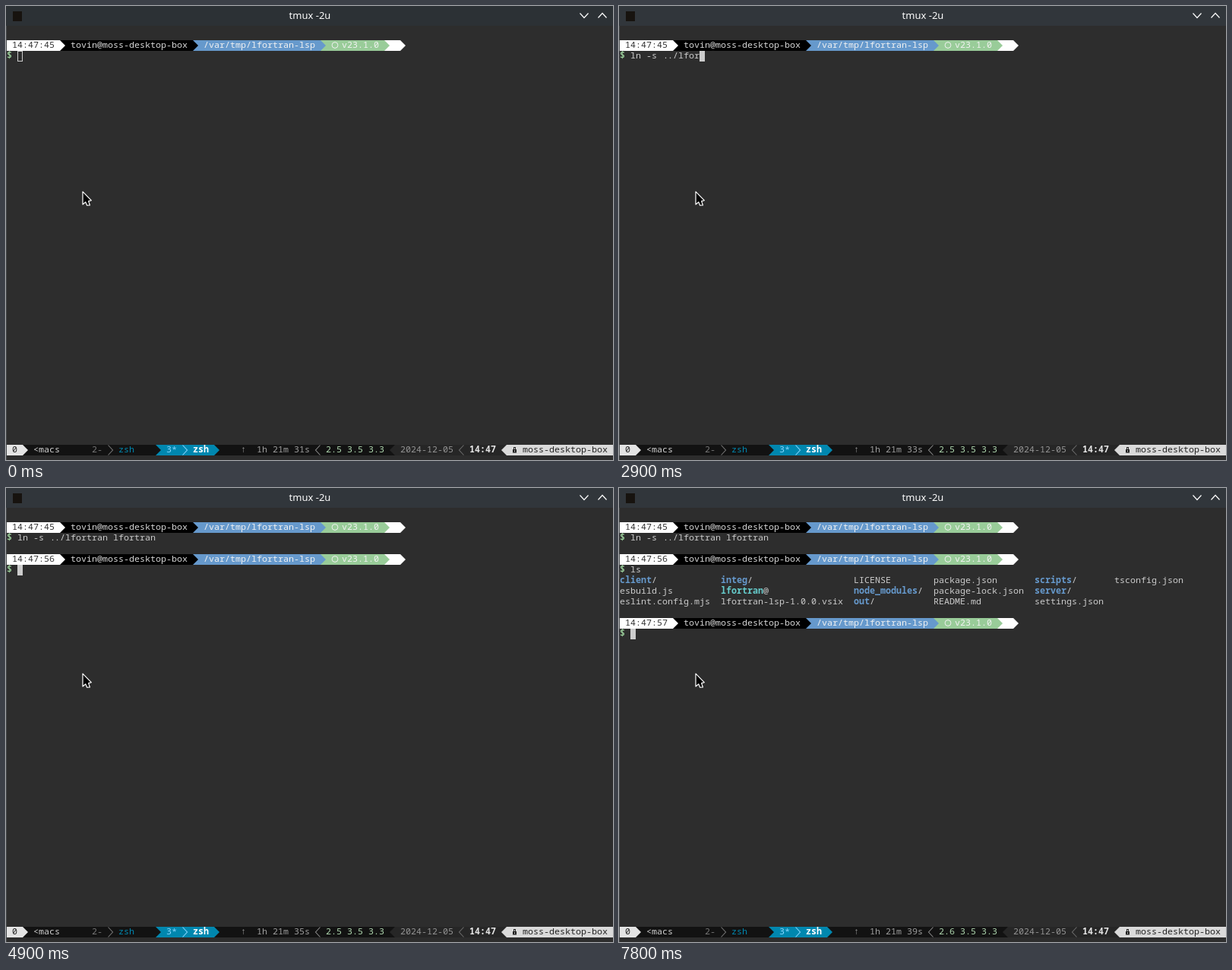
An HTML page with a canvas for the animation above (8000 ms loop, 799 px wide and 597 px high).

```html
<!DOCTYPE html>
<html lang="en">
<head>
<meta charset="utf-8">
<title>Terminal</title>
<style>
  html, body { margin: 0; width: 100%; height: 100%; overflow: hidden; background: #2d2d2d; }
  canvas { display: block; width: 799px; height: 597px; }
</style>
</head>
<body>
<canvas id="stage"></canvas>
<script>
const W = 799, H = 597, LOOP = 8000;
const CW = 7, CH = 14, TOP = 31;
const BG = '#2d2d2d', FG = '#cccccc', BLUE = '#6699cc', GREEN = '#99cc99', CYAN = '#66cccc';
const BAR = '#121212', TEAL = '#0087af', SKY = '#87d7ff', PALE = '#dadada';
const MONO = '11.667px "Noto Sans Mono", "DejaVu Sans Mono", monospace';
const USER = 'tovin', HOST = 'moss-desktop-box';

const canvas = document.getElementById('stage');
const ctx = canvas.getContext('2d');
const dpr = window.devicePixelRatio || 1;
canvas.width = Math.round(W * dpr);
canvas.height = Math.round(H * dpr);

const colX = c => 1 + c * CW;
const rowY = r => TOP + r * CH;

// Value of the last [time, value] step reached, or the fallback.
function stepAt(steps, t, fallback) {
  let v = fallback;
  for (const [at, value] of steps) if (t >= at) v = value;
  return v;
}

function fill(c, r, n, color) {
  ctx.fillStyle = color;
  ctx.fillRect(colX(c), rowY(r), n * CW, CH);
}

function text(s, c, r, color, weight = 500) {
  ctx.font = weight + ' ' + MONO;
  ctx.textAlign = 'left';
  ctx.textBaseline = 'alphabetic';
  ctx.fillStyle = color;
  for (let i = 0; i < s.length; i++) {
    const nudge = s.startsWith('../', i) ? 1 : 0;
    ctx.fillText(s[i], colX(c + i) + nudge, rowY(r) + 10);
  }
}

function path(points, close) {
  ctx.beginPath();
  points.forEach(([x, y], i) => i ? ctx.lineTo(x, y) : ctx.moveTo(x, y));
  if (close) ctx.closePath();
}

// Solid one-cell arrow; dir 1 points right, -1 left.
function arrow(c, r, color, back, dir = 1) {
  if (back) fill(c, r, 1, back);
  const x = colX(c), y = rowY(r);
  const base = dir > 0 ? x : x + CW, tip = dir > 0 ? x + CW : x;
  path([[base, y], [tip, y + CH / 2], [base, y + CH]], true);
  ctx.fillStyle = color;
  ctx.fill();
}

function line(points, color, width) {
  path(points);
  ctx.strokeStyle = color;
  ctx.lineWidth = width;
  ctx.stroke();
}

function chevron(c, r, color, dir = 1) {
  const x = colX(c), y = rowY(r);
  const base = dir > 0 ? x + 0.5 : x + CW - 0.5;
  const tip = dir > 0 ? x + CW - 0.5 : x + 0.5;
  line([[base, y + 0.5], [tip, y + CH / 2], [base, y + CH - 0.5]], color, 1.1);
}

function prompt(r, time) {
  fill(0, r, 10, '#ffffff');
  text(time, 1, r, '#333333');
  arrow(10, r, '#ffffff', '#000000');
  fill(11, r, 24, '#000000');
  text(USER + '@' + HOST, 12, r, '#d8d8d8');
  arrow(35, r, '#000000', BLUE);
  fill(36, r, 23, BLUE);
  text('/var/tmp/lfortran-lsp', 37, r, '#f2f2f2');
  arrow(59, r, BLUE, GREEN);
  fill(60, r, 11, GREEN);
  ctx.beginPath();
  ctx.arc(433, rowY(r) + 6.5, 3.9, 0, Math.PI * 2);
  ctx.strokeStyle = '#f2f2f2';
  ctx.lineWidth = 1;
  ctx.stroke();
  text('v23.1.0', 63, r, '#f2f2f2');
  arrow(71, r, GREEN, '#ffffff');
  fill(72, r, 2, '#ffffff');
  arrow(74, r, '#ffffff');
  text('$', 0, r + 1, GREEN, 700);
}

function cursor(c, r, hollow) {
  if (!hollow) return fill(c, r, 1, FG);
  ctx.strokeStyle = FG;
  ctx.lineWidth = 1;
  ctx.strokeRect(colX(c) + 0.5, rowY(r) + 0.5, CW - 1, CH - 1);
}

const LISTING = [
  [0, ['client/', 'esbuild.js', 'eslint.config.mjs']],
  [19, ['integ/', 'lfortran@', 'lfortran-lsp-1.0.0.vsix']],
  [44, ['LICENSE', 'node_modules/', 'out/']],
  [59, ['package.json', 'package-lock.json', 'README.md']],
  [78, ['scripts/', 'server/', 'settings.json']],
  [93, ['tsconfig.json']]
];

function listing(r) {
  for (const [c, names] of LISTING) {
    names.forEach((name, i) => {
      const mark = name.slice(-1);
      if (mark === '/' || mark === '@') {
        const stem = name.slice(0, -1);
        text(stem, c, r + i, mark === '/' ? BLUE : CYAN, 700);
        text(mark, c + stem.length, r + i, FG);
      } else {
        text(name, c, r + i, FG);
      }
    });
  }
}

function titleBar(t) {
  ctx.fillStyle = stepAt([[100, '#2f3438'], [200, '#31363b']], t, '#2c3135');
  ctx.fillRect(0, 0, W, 26);
  ctx.fillStyle = '#17130f';
  ctx.fillRect(9, 7, 12, 13);
  ctx.font = '13px "Noto Sans", "Open Sans", sans-serif';
  ctx.textAlign = 'center';
  ctx.textBaseline = 'alphabetic';
  ctx.fillStyle = '#fcfcfc';
  ctx.fillText('tmux -2u', 400, 17);
  line([[755.5, 9.5], [761, 15.5], [766.5, 9.5]], '#fcfcfc', 1.2);
  line([[779.5, 15.5], [785, 9.5], [790.5, 15.5]], '#fcfcfc', 1.2);
}

function lock(c, r) {
  const x = colX(c), y = rowY(r);
  ctx.fillStyle = '#222222';
  ctx.fillRect(x + 1, y + 6, 5, 4.5);
  ctx.strokeStyle = '#222222';
  ctx.lineWidth = 1;
  ctx.strokeRect(x + 2.5, y + 3.5, 2, 3);
  ctx.fillStyle = PALE;
  ctx.fillRect(x + 3, y + 7.5, 1, 1.5);
}

function statusBar(t) {
  const r = 39, dim = '#262626';
  const secs = stepAt([[1800, 33], [3800, 35], [5000, 37], [7800, 39]], t, 31);
  const load = t >= 7800 ? '2.6' : '2.5';

  fill(0, r, 114, BAR);
  fill(0, r, 3, '#e4e4e4');
  text('0', 1, r, '#222222');
  arrow(3, r, '#e4e4e4');
  text('<macs', 5, r, '#d0d0d0');
  text('2-', 16, r, '#767676');
  chevron(19, r, '#767676');
  text('zsh', 21, r, TEAL);

  arrow(28, r, BAR, TEAL);
  fill(29, r, 10, TEAL);
  text('3*', 30, r, SKY);
  chevron(33, r, SKY);
  text('zsh', 35, r, '#ffffff', 700);
  arrow(39, r, TEAL);

  text('\u2191', 44, r, '#9e9e9e');
  text('1h 21m ' + secs + 's', 47, r, '#9e9e9e');
  chevron(58, r, '#8a8a8a', -1);
  text(load + ' 3.5 3.3', 60, r, '#afd7af');

  arrow(72, r, dim, null, -1);
  fill(73, r, 21, dim);
  text('2024-12-05', 74, r, '#949494');
  chevron(85, r, '#6c6c6c', -1);
  text('14:47', 87, r, '#e4e4e4', 700);
  arrow(93, r, PALE, null, -1);
  fill(94, r, 20, PALE);
  lock(95, r);
  text(HOST, 97, r, '#222222');
}

function pointer() {
  path([[101, 244.2], [101, 261], [104.8, 257.8], [106.6, 262.2],
        [110.4, 262], [108.6, 256.6], [112.3, 255.6]], true);
  ctx.lineJoin = 'round';
  ctx.fillStyle = '#000000';
  ctx.fill();
  ctx.strokeStyle = '#ffffff';
  ctx.lineWidth = 1.2;
  ctx.stroke();
  ctx.lineJoin = 'miter';
}

const LINK = 'ln -s ../lfortran lfortran';
const LINK_KEYS = [
  [1100, 1], [1200, 2], [1300, 3], [1400, 4], [1500, 6], [1900, 7], [2000, 8],
  [2400, 9], [2700, 10], [2800, 12], [2900, 13], [3100, 15], [3200, 17],
  [3700, 18], [3900, 19], [4000, 20], [4100, 21], [4200, 22], [4300, 23],
  [4500, 24], [4600, 25], [4700, 26]
];
const LIST_KEYS = [[5400, 1], [5500, 2]];
const RUN_LINK = 4900, RUN_LIST = 5600, DONE = 5700;

function terminal(t) {
  const typed = stepAt(LINK_KEYS, t, 0);
  const listed = stepAt(LIST_KEYS, t, 0);
  prompt(1, '14:47:45');
  text(LINK.slice(0, typed), 2, 2, FG);
  if (t >= RUN_LINK) {
    prompt(4, '14:47:56');
    text('ls'.slice(0, listed), 2, 5, FG);
  }
  if (t >= RUN_LIST) listing(6);
  if (t >= DONE) prompt(10, '14:47:57');

  if (t < RUN_LINK) {
    if (t < 600 || t >= 1100) cursor(2 + typed, 2, t < 100);
  } else if (t < RUN_LIST) {
    cursor(2 + listed, 5);
  } else if (t < DONE) {
    cursor(0, 9);
  } else if (t < 6100 || Math.floor((t - 6100) / 500) % 2) {
    cursor(2, 11);
  }
}

function draw(t) {
  ctx.setTransform(dpr, 0, 0, dpr, 0, 0);
  ctx.fillStyle = BG;
  ctx.fillRect(0, 0, W, H);
  titleBar(t);
  terminal(t);
  statusBar(t);
  ctx.fillStyle = '#44484b';
  ctx.fillRect(0, 26, 1, H - 26);
  pointer();
}

const start = performance.now();
function tick() {
  draw((performance.now() - start) % LOOP);
  requestAnimationFrame(tick);
}
tick();
</script>
</body>
</html>
```
